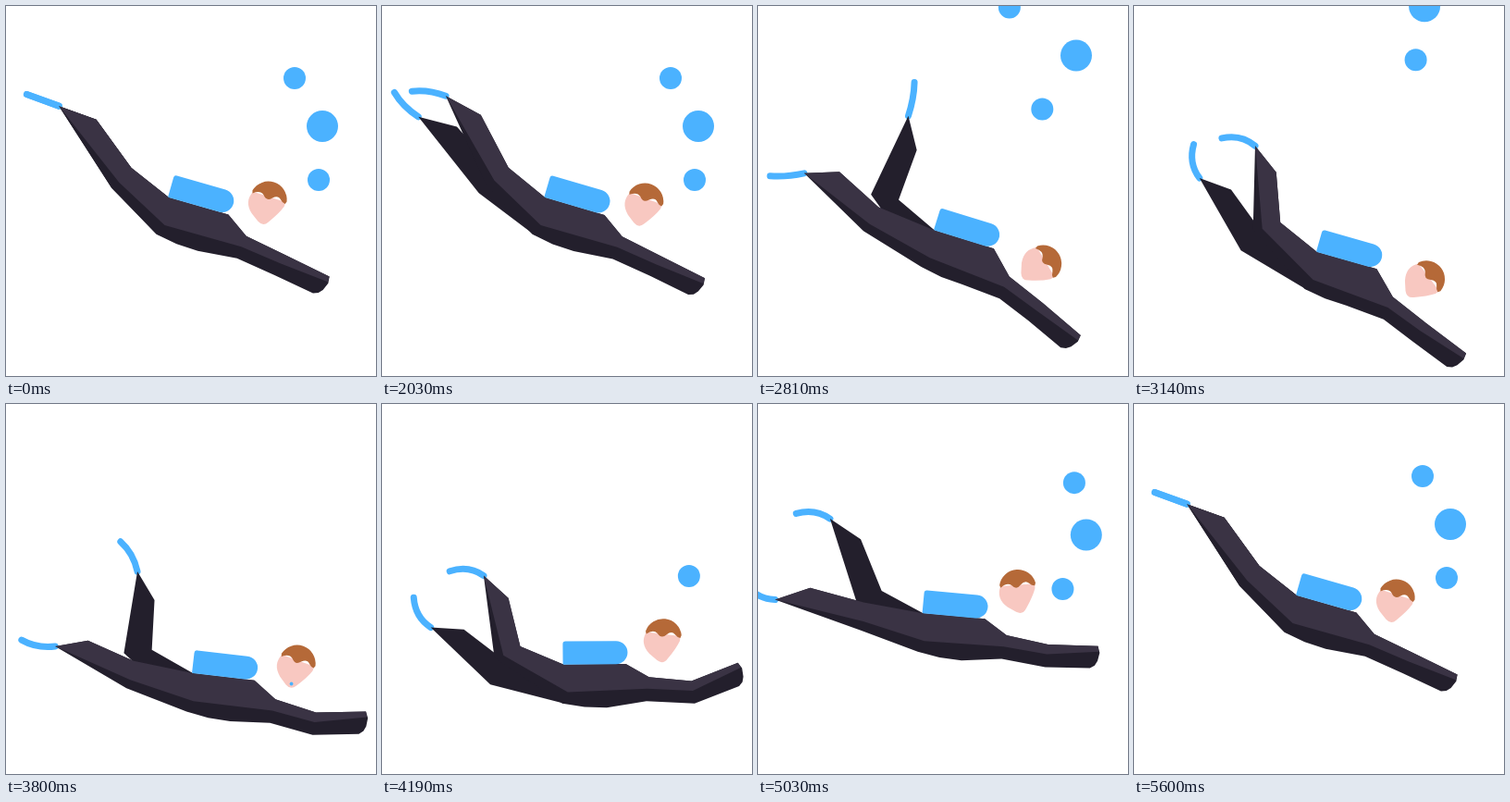
Recreate the animation shown at these times as an HTML page with a canvas. Size 400 by 400 pixels, loop 5630 ms.

```html
<!DOCTYPE html>
<html lang="en">
<head>
<meta charset="utf-8">
<title>Diver</title>
<style>
  html, body { margin: 0; width: 100%; height: 100%; overflow: hidden; background: #fff; }
  canvas { display: block; width: 400px; height: 400px; }
</style>
</head>
<body>
<canvas width="400" height="400"></canvas>
<script>
const ctx = document.querySelector('canvas').getContext('2d');
const LOOP = 5630, HOLD = 2030, STEP = 30, START = 2000, END = 5600;
const LIGHT = '#3a3344', DARK = '#231f2c', BLUE = '#4bb2ff', HAIR = '#b56938', SKIN = '#f8c8c1';
const RAD = Math.PI / 180;
const cos = deg => Math.cos(deg * RAD), sin = deg => Math.sin(deg * RAD);

// Point (x, y) of a frame turned by deg around origin
const at = ([ox, oy], deg, x, y) =>
  [ox + x * cos(deg) - y * sin(deg), oy + x * sin(deg) + y * cos(deg)];

function poly(color, ...points) {
  ctx.beginPath();
  points.forEach(p => ctx.lineTo(...p));
  ctx.fillStyle = color;
  ctx.fill();
}

function placed([x, y], deg, paint) {
  ctx.save();
  ctx.translate(x, y);
  ctx.rotate(deg * RAD);
  paint();
  ctx.restore();
}

// Every part swings once per dive: mean, first and second harmonic
function poseAt(p) {
  const q = 360 * p;
  const wave = (mean, c, s, c2 = 0, s2 = 0) =>
    mean + c * cos(q) + s * sin(q) + c2 * cos(2 * q) + s2 * sin(2 * q);
  return {
    hip: [wave(189, -13, 4), wave(249, -42, 0)],
    tilt: wave(9.7, 4.7, 8.9, 1.6, -1.3),
    upperArm: wave(22, 4, 17, 0, -3),
    foreArm: wave(12.5, 13.5, 28, 0, -6),
    head: [wave(298.5, -15.5, 11.5), wave(247.5, -35.5, 35, -2)],
    headTilt: wave(23.5, -1, 31, -4.5, 3),
    calf: wave(49, -7, 5, -4, 7),
    foot: wave(38.5, 3.5, 0, 1),
    kick: 3 * q + 80 * sin(q / 2) + wave(0, 0, -15, 0, 12),
    flex: 55 * Math.tanh(20 * sin(q / 2))
  };
}

function fin(toe, angle, turn) {
  ctx.beginPath();
  ctx.moveTo(...toe);
  ctx.quadraticCurveTo(...at(toe, angle - turn / 2, -20, 0), ...at(toe, angle, -37, 0));
  ctx.strokeStyle = BLUE;
  ctx.lineWidth = 7;
  ctx.lineCap = 'round';
  ctx.stroke();
}

// Draws the fin and returns the joints of one leg
function leg({ hip, tilt, calf, foot, flex }, phase) {
  const s = sin(phase), c = cos(phase);
  const thigh = 14 + 9 * Math.tanh(9 * s + 1.6);
  const shin = tilt + calf + 35 * s;
  // The foot trails while a lowered leg swings back up
  const sole = shin - 34 + 45 * Math.min(0, s) * Math.max(0, c);
  const knee = at(hip, tilt + thigh, -51 - (23 - thigh) * 0.8, 0);
  const ankle = at(knee, shin, -1.5 * foot, 0);
  const toe = at(ankle, sole, -foot, 0);
  fin(toe, sole - flex * (c - 0.2), -flex * cos(phase - 30));
  return { top: [toe, ankle, knee, hip], heel: at(knee, shin, 5, 30), crease: at(knee, shin, 5, 20) };
}

function diver(pose) {
  const { hip, tilt, upperArm, foreArm, kick } = pose;
  const body = (x, y) => at(hip, tilt, x, y);
  const armY = 11 + 0.6 * (upperArm - tilt);
  const armpit = body(92, armY), elbow = at(armpit, upperArm, 46, 0);
  const under = depth => at(elbow, (upperArm + foreArm) / 2, 0, depth);
  const hand = (x, y) => at(elbow, foreArm, x, y);

  const far = leg(pose, kick + 180);
  poly(DARK, ...far.top, body(20, 41), body(0, 42), far.heel);
  const near = leg(pose, kick);
  const top = [...near.top, body(67, 0), armpit, elbow, hand(54, 0)];
  poly(DARK, ...top, hand(56, 7), hand(54, 16), hand(51, 21), hand(46, 24), under(24.5),
    body(89, armY + 26), body(46, 47), body(22, 46), body(-2, 42), near.heel);
  poly(LIGHT, ...top, hand(55, 6), under(10.5), body(90, armY + 12.5), body(4, 30), near.crease);
  placed(hip, tilt, tank);
  placed(pose.head, pose.headTilt, head);
}

function tank() {
  ctx.beginPath();
  ctx.roundRect(-1, -25, 70, 25, [3, 12.5, 12.5, 1]);
  ctx.fillStyle = BLUE;
  ctx.fill();
}

const FACE = new Path2D('M19-4L19 1Q16 10 8 22Q4 29-3 25L-12 19Q-24 9-18-4Z');
const FRINGE = new Path2D('M-19-5L-18-2Q-11-8-6-4Q-1 2 4-4Q9-9 13-5Q16-2 19-2L20-5A20 20 0 0 0-19-5Z');
function head() {
  ctx.fillStyle = SKIN;
  ctx.fill(FACE);
  ctx.fillStyle = HAIR;
  ctx.fill(FRINGE);
}

const BUBBLES = [
  { x: 312, y: 78, size: 12, birth: 3765, depth: 38.5, sway: 35, drift: -29 },
  { x: 342, y: 130, size: 17, birth: 4240, depth: 62, sway: 15, drift: 20 },
  { x: 338, y: 188, size: 12, birth: 4480, depth: 65, sway: -10, drift: -18 }
];

// A bubble speeds up out of the stage, then is born again and slows down to its place
function bubble({ x, y, size, birth, depth, sway, drift }, t) {
  const gone = Math.max(0, t - HOLD) / 1000, left = (END - t) / 1000;
  if (t < birth) {
    x += drift * Math.sin(2.7 * gone) - 25 * gone ** 2;
    y -= 111 * gone ** 1.5;
  } else {
    x += sway * Math.sin(1.8 * left);
    y += depth * left ** 3;
    size = Math.min(size, (t - birth) * 0.055);
  }
  ctx.beginPath();
  ctx.arc(x, y, size, 0, 7);
  ctx.fillStyle = BLUE;
  ctx.fill();
}

function draw(t) {
  ctx.fillStyle = '#fff';
  ctx.fillRect(0, 0, 400, 400);
  diver(poseAt((t - START) / (END - START)));
  BUBBLES.forEach(b => bubble(b, t));
}

function tick() {
  const t = performance.now() % LOOP;
  // The held pose equals the closing one
  draw(t < HOLD ? END : HOLD + Math.floor((t - HOLD) / STEP) * STEP);
  requestAnimationFrame(tick);
}
tick();
</script>
</body>
</html>
```
